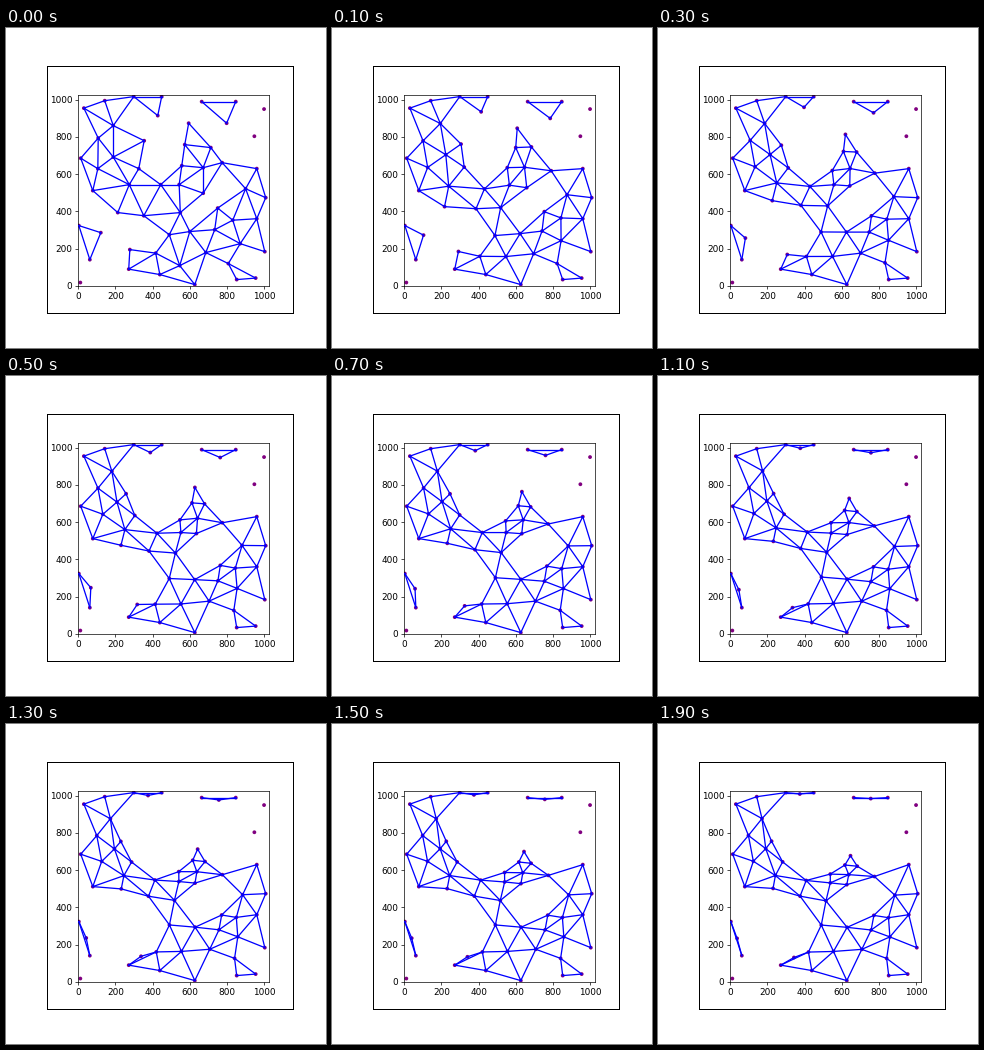
Write a matplotlib script that moves like this. It is 320 px wide and 320 px high and loops after 2 s.

```python
import numpy as np
import matplotlib.pyplot as plt
from matplotlib.animation import FuncAnimation
from matplotlib.collections import LineCollection
from matplotlib.patches import Rectangle
from matplotlib.tri import Triangulation

SIZE, DPI, FRAMES, INTERVAL = 320, 100, 20, 100
SCALE = 0.6175      # plot panel relative to matplotlib's default sizes
WORLD = 1024
MARGIN = 100        # points this close to the border stay pinned
REACH = 200         # triangles with a longer side are dropped
RATE = 0.00074      # spring step: pull grows with edge length squared

# Scattered starting points, the only input; links and motion follow from them
START = np.array([
    (31, 955), (143, 995), (299, 1017), (449, 1017), (428, 915), (189, 861),
    (108, 794), (355, 780), (14, 686), (189, 692), (106, 630), (326, 630),
    (79, 512), (275, 544), (213, 394), (353, 377), (444, 544), (594, 874),
    (573, 759), (713, 743), (557, 646), (672, 635), (774, 662), (543, 544),
    (672, 498), (549, 394), (960, 630), (900, 522), (1008, 474), (750, 418),
    (831, 353), (960, 361), (871, 227), (1003, 184), (734, 302), (600, 292),
    (490, 275), (686, 179), (807, 120), (852, 34), (954, 42), (627, 7),
    (546, 109), (417, 176), (278, 195), (272, 90), (439, 61), (4, 324),
    (63, 141), (122, 286), (664, 990), (847, 990), (798, 874), (999, 950),
    (947, 804), (12, 18)], float)


def link(points):
    """Edges of the Delaunay triangles whose sides are all short enough."""
    tris = Triangulation(*points.T).triangles
    sides = points[tris] - points[np.roll(tris, 1, axis=1)]
    tris = tris[np.linalg.norm(sides, axis=2).max(axis=1) < REACH]
    pairs = np.concatenate([tris[:, [0, 1]], tris[:, [1, 2]], tris[:, [2, 0]]])
    return np.unique(np.sort(pairs, axis=1), axis=0)


def relax(points):
    a, b = edges.T
    gap = points[b] - points[a]
    pull = gap * np.linalg.norm(gap, axis=1, keepdims=True)
    force = np.zeros_like(points)
    np.add.at(force, a, pull)
    np.add.at(force, b, -pull)
    return points + RATE * force * free


edges = link(START)
border = np.minimum(START, WORLD - START).min(axis=1, keepdims=True)
free = border > MARGIN

states = [START]
for _ in range(FRAMES - 1):
    states.append(relax(states[-1]))

fig = plt.figure(figsize=(SIZE / DPI, SIZE / DPI), dpi=DPI, facecolor="white")
fig.add_artist(Rectangle((41 / SIZE, 35 / SIZE), 246 / SIZE, 247 / SIZE,
                         fill=False, edgecolor="black", linewidth=0.72,
                         antialiased=False))

ax = fig.add_axes([72.1 / SIZE, 62.1 / SIZE, 190.6 / SIZE, 190.6 / SIZE])
ticks = range(0, WORLD, 200)
ax.set(xlim=(0, WORLD), ylim=(0, WORLD), xticks=ticks, yticks=ticks)
ax.tick_params(labelsize=10.3 * SCALE, width=0.8 * SCALE,
               length=3.5 * SCALE, pad=3.5 * SCALE)
for spine in ax.spines.values():
    spine.set_linewidth(0.8 * SCALE)

dots = ax.scatter(*START.T, s=7.5, color="purple", edgecolors="none", zorder=2)
lines = LineCollection([], colors="blue", linewidths=1.5 * SCALE,
                       capstyle="projecting", zorder=3)
ax.add_collection(lines)


def draw(frame):
    points = states[frame]
    dots.set_offsets(points)
    lines.set_segments(points[edges])
    return dots, lines


anim = FuncAnimation(fig, draw, frames=FRAMES, init_func=lambda: draw(0),
                     interval=INTERVAL, repeat=True, repeat_delay=0)
plt.show()
```
